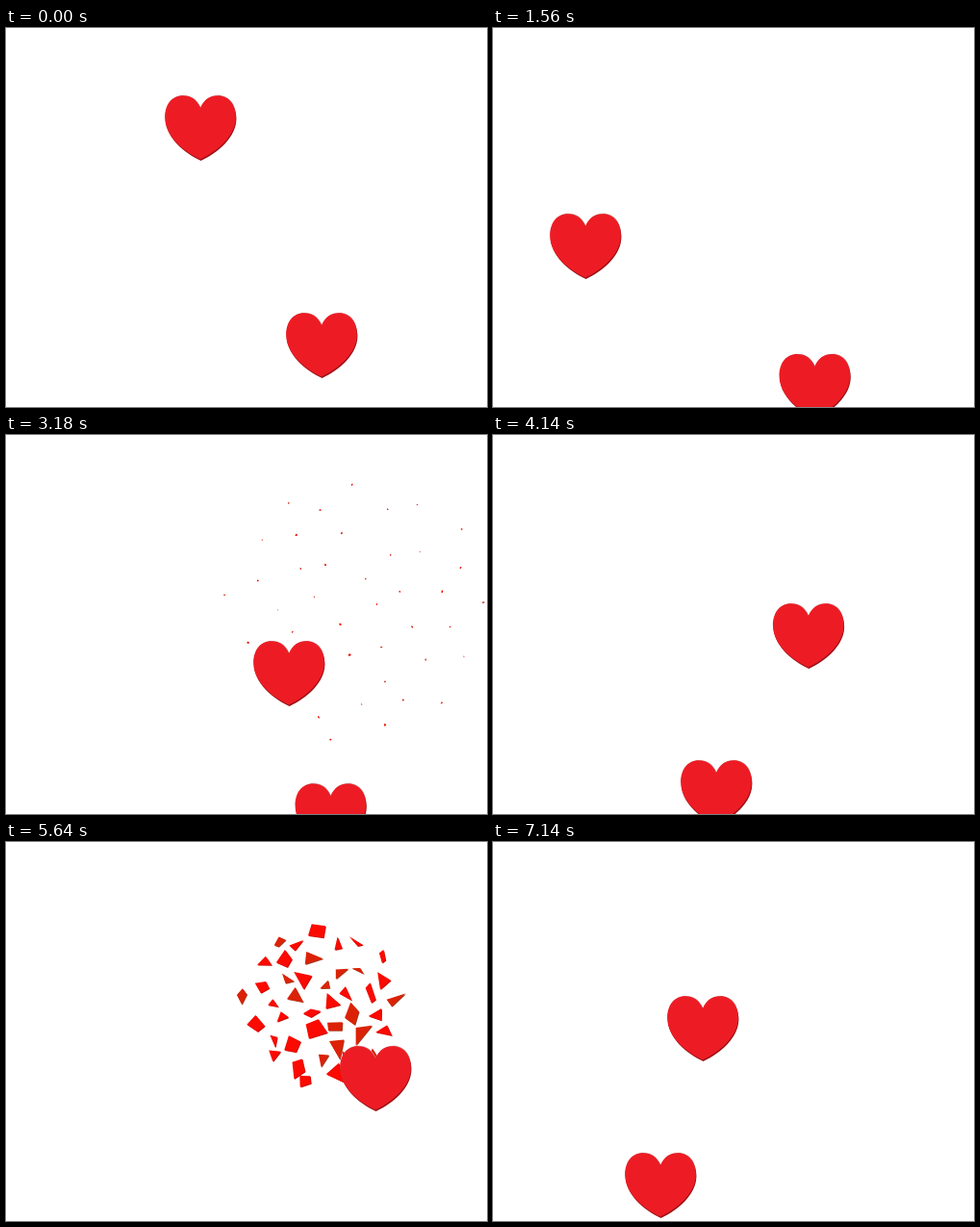
Write an HTML page with a canvas that moves like this. It is 500 px wide and 394 px high and loops after 7200 ms.

```html
<!DOCTYPE html>
<html lang="en">
<head>
<meta charset="utf-8">
<title>Bursting hearts</title>
<style>
html, body { margin: 0; width: 100%; height: 100%; overflow: hidden; background: #fff; }
canvas { display: block; }
</style>
</head>
<body>
<canvas width="500" height="394"></canvas>
<script>
const WIDTH = 500, HEIGHT = 394;
const LOOP = 7200, STEP = 60, BURST = 620;
const SHARDS = 42, RADIUS = 84;
const ctx = document.querySelector('canvas').getContext('2d');

// Hearts enter at the bottom edge, rise in a straight line and burst.
// Times in ms, speeds in px/s.
const hearts = [
  { enter: -1906, x: 202, drift: 0, rise: 170, burst: 60 },
  { enter: -560, x: 295.5, drift: 58, rise: 175, burst: 720 },
  { enter: 411, x: 96, drift: 0, rise: 175, burst: 1680 },
  { enter: 1258, x: 325, drift: 31, rise: 183, burst: 2600 },
  { enter: 2089, x: 346.4, drift: -48, rise: 165, burst: 3460 },
  { enter: 3017, x: 339, drift: -10, rise: 195, burst: 4440 },
  { enter: 3809, x: 205.5, drift: 80, rise: 169, burst: 5340 },
  { enter: 4801, x: 371.4, drift: 15, rise: 217, burst: 6140 },
  { enter: 5747, x: 233.3, drift: -11, rise: 168, burst: LOOP },
  { enter: 6699, x: 213.7, drift: -90, rise: 161, burst: LOOP }
];

let seed = 29;
const rnd = () => (seed = seed * 16807 % 2147483647) / 2147483647;
const between = (a, b) => a + (b - a) * rnd();

// Shards fill a disc evenly along a golden-angle spiral.
const shards = Array.from({ length: SHARDS }, (_, i) => {
  const dist = RADIUS * Math.sqrt((i + 0.5) / SHARDS);
  const dir = i * 2.4;
  const corners = rnd() < 0.55 ? 3 : 4;
  const size = between(7, 12.5);
  const points = Array.from({ length: corners }, (_, k) => {
    const a = (k + between(0, 0.5)) / corners * 2 * Math.PI;
    const r = size * between(0.85, 1.25);
    return [Math.cos(a) * r, Math.sin(a) * r];
  });
  return {
    x: dist * Math.cos(dir) + between(-5, 5),
    y: dist * Math.sin(dir) + between(-5, 5),
    points,
    angle: between(0, 6.28),
    tilt: between(0, 6.28),
    spin: between(-3, 3),
    bright: rnd() < 0.5
  };
});

const heart = new Path2D('M0 13C-4 4-10 .3-18 .3C-30 .3-36.8 10-36.8 23C-36.8 42-18 58 0 66.5' +
  'C18 58 36.8 42 36.8 23C36.8 10 30 .3 18 .3C10 .3 4 4 0 13Z');

function fillAt(path, x, y, color) {
  ctx.save();
  ctx.translate(x, y);
  ctx.fillStyle = color;
  ctx.fill(path);
  ctx.restore();
}

function drawHeart(x, y) {
  fillAt(heart, x + 0.5, y - 0.4, '#c99a9c');
  fillAt(heart, x + 0.6, y + 1.6, '#9c1016');
  fillAt(heart, x, y, '#ed1c24');
}

function drawBurst(cx, cy, p) {
  const grow = 0.4 + 1.1 * p + 0.3 * p * p;
  const scale = Math.min(1, 1.9 * (1 - p));
  for (const s of shards) {
    const angle = s.angle + s.spin * p;
    const squash = 0.35 + 0.6 * Math.abs(Math.cos(s.tilt + s.spin * p));
    const cos = Math.cos(angle), sin = Math.sin(angle);
    const path = new Path2D();
    for (const [px, py] of s.points) {
      const u = px * scale, v = py * scale * squash;
      path.lineTo(u * cos - v * sin, u * sin + v * cos);
    }
    path.closePath();
    const x = cx + s.x * grow, y = cy + s.y * grow;
    fillAt(path, x + 0.8 * scale, y + 0.8 * scale, s.bright ? '#c80800' : '#a33a20');
    fillAt(path, x, y, s.bright ? '#fa0a00' : '#dc2206');
  }
}

function draw(now) {
  const t = Math.floor(now % LOOP / STEP) * STEP;
  ctx.clearRect(0, 0, WIDTH, HEIGHT);
  for (const h of hearts) {
    const age = (Math.min(t, h.burst) - h.enter) / 1000;
    if (age < 0) continue;
    const x = h.x + h.drift * age, y = HEIGHT - h.rise * age;
    const p = (t - h.burst) / BURST;
    if (p < 0) drawHeart(x, y);
    else if (p < 1) drawBurst(x, y + 34, p);
  }
}

const start = performance.now();
function tick() {
  draw(performance.now() - start);
  requestAnimationFrame(tick);
}
tick();
</script>
</body>
</html>
```
